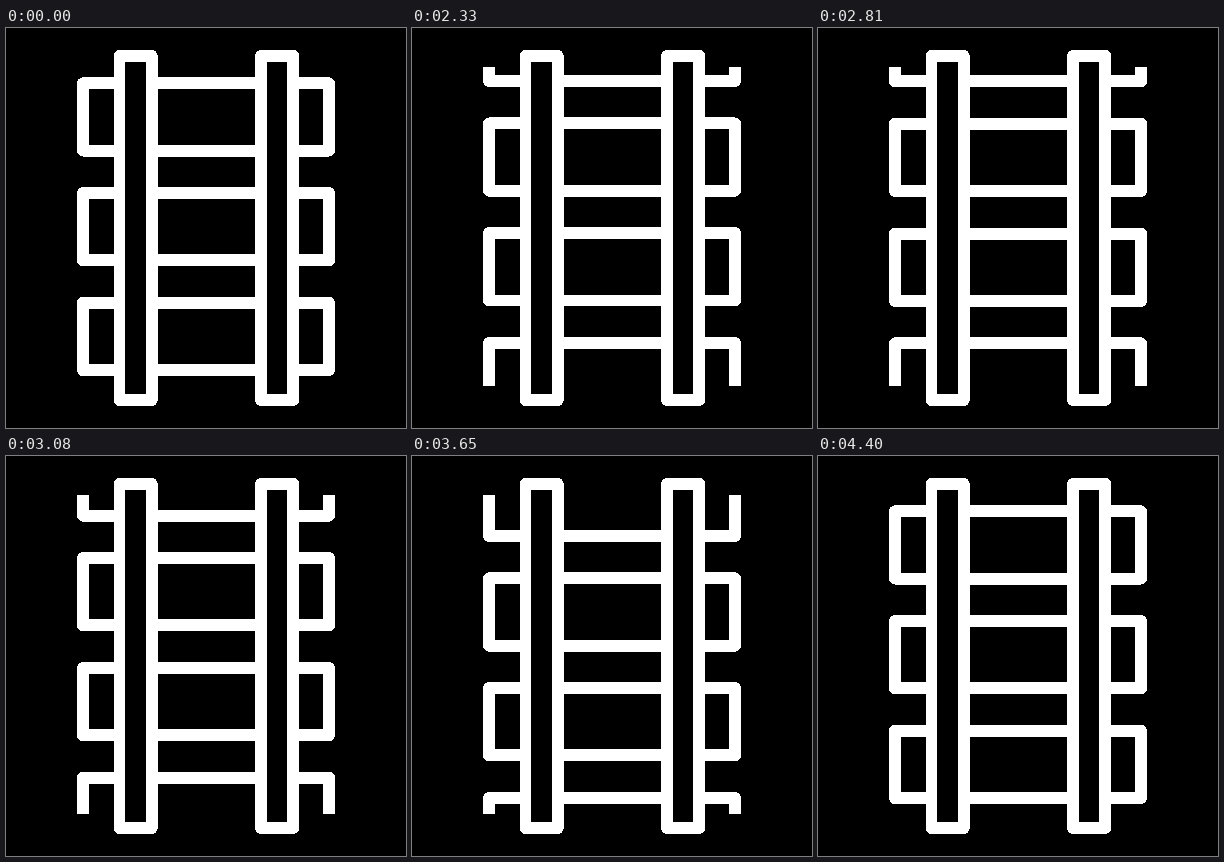
These frames come from a looping animation (400 px wide and 400 px high, 4.43 s). An HTML page:

```html
<!DOCTYPE html>
<html lang="en">
<head>
<meta charset="utf-8">
<title>Railway track</title>
<style>
  html, body { margin: 0; width: 100%; height: 100%; overflow: hidden; background: #000; }
  svg { display: block; width: 100%; height: 100%; shape-rendering: crispEdges; }
  .line { fill: none; stroke: #fff; stroke-width: 11.9; stroke-linejoin: round; }
</style>
</head>
<body>
<svg viewBox="0 0 400 400">
  <defs>
    <clipPath id="window"><rect x="60" y="39" width="280" height="319"/></clipPath>
  </defs>
  <g clip-path="url(#window)"><g id="sleepers" class="line"></g></g>
  <rect x="113.5" y="28" width="32.3" height="344"/>
  <!-- the right bed starts one pixel below the window, so a passing sleeper shows a hairline -->
  <rect x="254.9" y="40" width="32.3" height="332"/>
  <g class="line">
    <rect x="113.5" y="28" width="32.3" height="344"/>
    <rect x="254.9" y="28" width="32.3" height="344"/>
  </g>
</svg>
<script>
  const PITCH = 109.77, TOP = 55.3, LAPS = 5;
  const LOOP = 4430, START = 2000, END = 4400;
  const sleepers = document.getElementById('sleepers');

  // Animating y rather than transform keeps the edges sharp between whole pixels.
  function addSleeper(slot) {
    const rect = document.createElementNS('http://www.w3.org/2000/svg', 'rect');
    const box = { x: 77, width: 246, height: 67.3 };
    for (const key in box) rect.setAttribute(key, box[key]);
    sleepers.append(rect);

    const rest = `${TOP + slot * PITCH}px`;
    const done = `${TOP + (slot + LAPS) * PITCH}px`;
    rect.animate([
      { offset: 0, y: rest },
      { offset: START / LOOP, y: rest, easing: 'cubic-bezier(.333, 0, .267, 1)' },
      { offset: END / LOOP, y: done },
      { offset: 1, y: done }
    ], { duration: LOOP, iterations: Infinity });
  }

  for (let slot = -LAPS; slot < 3; slot++) addSleeper(slot);
</script>
</body>
</html>
```
